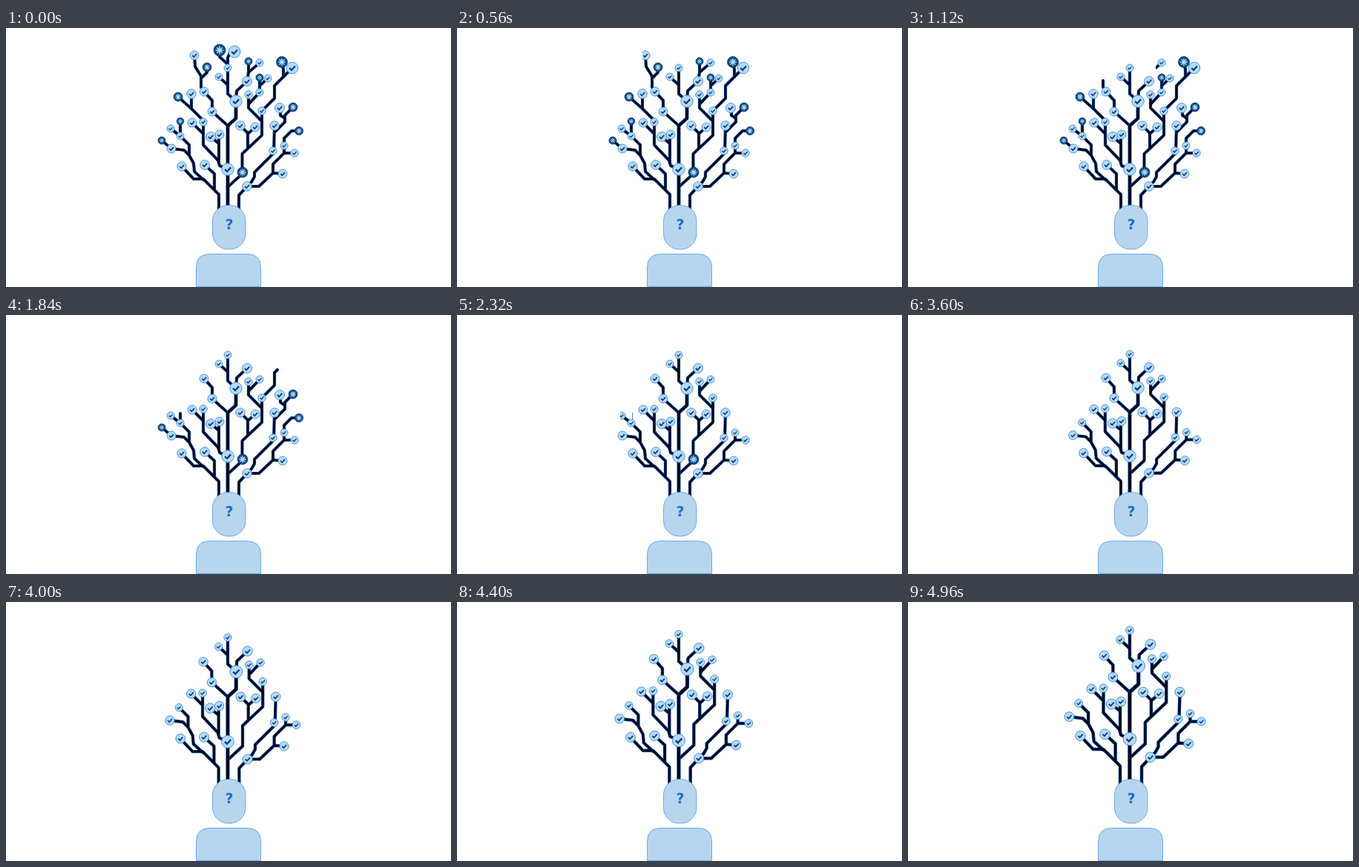
These frames come from a looping animation (600x350 px, 5040 ms). An HTML page:

```html
<!DOCTYPE html>
<html lang="en">
<head>
<meta charset="utf-8">
<style>
  html, body { margin: 0; width: 100%; height: 100%; overflow: hidden; background: #fff; }
  svg { display: block; width: 100vw; height: 100vh; }
  .edge, .core { fill: none; stroke-linejoin: round; stroke-linecap: round; }
  .edge { stroke: #0a4fa8; }
  .core { stroke: #02061c; }
  .skin { fill: #b8d5ee; stroke: #4d9be2; stroke-width: .8; }
  .light { fill: #b5daf9; stroke: #3c8edb; stroke-width: .9; }
  .dark { fill: #0d4a85; stroke: #08386c; stroke-width: .8; }
  .tick { fill: none; stroke: #123f76; }
  .rays { fill: none; stroke: #b5daf9; }
  text { font: bold 19px "DejaVu Sans", "Open Sans", sans-serif; fill: #1b6fcf; text-anchor: middle; }
</style>
</head>
<body>
<svg viewBox="0 0 600 350">
  <defs id="defs"></defs>
  <g id="tree">
    <g id="limbs"></g>
    <g id="twigs"></g>
    <g id="nodes"></g>
  </g>
  <rect class="skin" x="278.5" y="239.5" width="44.5" height="59.5" rx="21"/>
  <path class="skin" d="M256.500 349.500V324Q256.500 305.500 275 305.500H325Q343.500 305.500 343.500 324V349.500Z"/>
  <text x="301" y="272">?</text>
</svg>
<script>
const NS = 'http://www.w3.org/2000/svg';
const LOOP = 5040, STEP = 80, PIVOT_X = 300, PIVOT_Y = 272;
const byId = id => document.getElementById(id);

function add(parent, tag, attrs) {
  const el = document.createElementNS(NS, tag);
  for (const key in attrs) el.setAttribute(key, attrs[key]);
  parent.appendChild(el);
  return el;
}

function lines(parent, d, width) {
  add(parent, 'path', { class: 'edge', d, 'stroke-width': width + 1 });
  add(parent, 'path', { class: 'core', d, 'stroke-width': width - .3 });
}

function check(parent, x, y, r) {
  const g = add(parent, 'g', { transform: `translate(${x} ${y})` });
  add(g, 'circle', { class: 'light', r });
  add(g, 'path', {
    class: 'tick', 'stroke-width': r * .28,
    d: `M${-r * .48} 0L${-r * .12} ${r * .36}L${r * .5} ${-r * .32}`
  });
}

function star(parent, x, y, r) {
  const g = add(parent, 'g', { transform: `translate(${x} ${y})` });
  add(g, 'circle', { class: 'dark', r });
  let d = '';
  for (let i = 0; i < 4; i++) {
    const a = i * Math.PI / 4, c = Math.cos(a) * r * .65, s = Math.sin(a) * r * .65;
    d += `M${c} ${s}L${-c} ${-s}`;
  }
  add(g, 'path', { class: 'rays', d, 'stroke-width': r * .2 });
}

// Branches that stay
lines(byId('limbs'), [
  'M287 262V225L266 204H253L237 187', 'M281 218V197L268 185',
  'M266 205L254 194L253 183L247 172L240 165L223 163', 'M247 172V158L235 146',
  'M299 191L288 186L286 179L266 158V127', 'M266 143L251 128',
  'M287 182V144', 'M287 156L276 147',
  'M299 132L278 113V98L267 86', 'M310 99L311 85L325 72',
  'M310 99L299 89V54', 'M299 77L287 66',
  'M299 215L318.500 197V170L345 145V112', 'M326 162V142L316 132M326 143L336 134',
  'M345 126L327 108V90', 'M327 103L342 87',
  'M314 262V226L325 214H341L360 196V184L375 169V159',
  'M375 169L389 169M360 196L373 197',
  'M325 214L331 208L335 201V195L361 169L362 132'
].join(''), 3.2);
lines(byId('limbs'), 'M299 262V132L310 122V99', 4);

const kept = [
  [299, 54, 5], [287, 66, 5], [325, 72, 6.5], [310, 99, 8.2], [267, 86, 6], [278, 113, 6],
  [251, 128, 6], [266, 127, 5.2], [276, 147, 6.5], [288, 144, 6], [299, 191, 8.2],
  [235, 146, 5], [223, 163, 6], [237, 187, 6.2], [268, 185, 6.4],
  [327, 90, 5.2], [342, 87, 5], [345, 112, 5.2], [316, 132, 6.2], [336, 134, 6],
  [362, 132, 6.2], [360, 166, 5.2], [375, 159, 5], [389, 169, 5.2], [373, 197, 6], [325, 214, 6.3]
];
for (const n of kept) check(byId('nodes'), ...n);

// Twigs that get wiped away: start, duration, path, node kind, x, y, radius
const twigs = [
  [80, 210, 'M299 54V49L288 39V30', star, 288, 30, 8],
  [290, 210, 'M299 54V40L302 33L308 32', check, 308, 32, 8],
  [500, 260, 'M263 70V65L255 52L254 37', check, 254, 37, 6],
  [740, 160, 'M263 68L271 60V53', star, 271, 53, 6],
  [890, 150, 'M325 72L327 60V45', star, 327, 45, 5],
  [1065, 140, 'M327 60L342 47', check, 342, 47, 5],
  [1200, 120, 'M374 66V56L372 46', star, 372, 46, 7.5],
  [1260, 140, 'M366 74L386 54', check, 386, 54, 7.8],
  [1360, 120, 'M342 87V67', star, 342, 67, 5],
  [1440, 120, 'M342 78L353 68', check, 353, 68, 5],
  [1520, 120, 'M250 109L232 93', star, 232, 93, 6],
  [1600, 120, 'M265 124L250 109V89', check, 250, 89, 6.3],
  [1680, 120, 'M267 86L263 80V71'],
  [1720, 110, 'M235 138V126', star, 235, 126, 4.8],
  [1850, 120, 'M345 112L362 95V78L366 74'],
  [1930, 120, 'M376 122V118L387 107', star, 387, 107, 6],
  [2010, 120, 'M362 141L376 127V122L370 118V108', check, 369, 108, 6.5],
  [2090, 120, 'M375 159V149L385 139H395', star, 395, 139, 5.6],
  [2170, 120, 'M223 163L210 152', star, 210, 152, 5],
  [2230, 120, 'M235 146V133'],
  [2290, 120, 'M235 146L222 136', check, 222, 136, 5],
  [2360, 120, 'M318 197L319 195', star, 319, 195, 7]
].map(([start, length, d, node, x, y, r], i) => {
  const clip = add(byId('defs'), 'clipPath', { id: 'wipe' + i });
  const mask = add(clip, 'rect', { y: 0, width: 600, height: 350 });
  const g = add(byId('twigs'), 'g', { 'clip-path': `url(#wipe${i})` });
  lines(g, d, 3.2);
  if (node) node(g, x, y, r);
  const box = g.getBBox();
  return { start, length, g, mask, left: box.x - 3, span: box.width + 6 };
});

const clamp = v => Math.max(0, Math.min(1, v));

// A short pulse, then steady growth to the end of the loop
function growth(t) {
  if (t >= 3520) {
    const u = (t - 3520) / 1440;
    return .073 * u * (1.2 - .2 * u);
  }
  const p = clamp((t - 2880) / 400);
  return .024 * Math.sin(Math.PI * p) ** 3;
}

function draw(time) {
  const t = Math.floor((time % LOOP) / STEP) * STEP;
  for (const w of twigs) {
    const p = clamp((t - w.start) / w.length);
    w.g.setAttribute('visibility', p < 1 ? 'visible' : 'hidden');
    w.mask.setAttribute('x', p ? w.left + w.span * p : 0);
  }
  const s = 1 + growth(t);
  byId('tree').setAttribute('transform',
    `translate(${PIVOT_X} ${PIVOT_Y}) scale(${s}) translate(${-PIVOT_X} ${-PIVOT_Y})`);
}

const begin = performance.now();
function tick() {
  draw(performance.now() - begin);
  requestAnimationFrame(tick);
}
draw(0);
requestAnimationFrame(tick);
</script>
</body>
</html>
```
